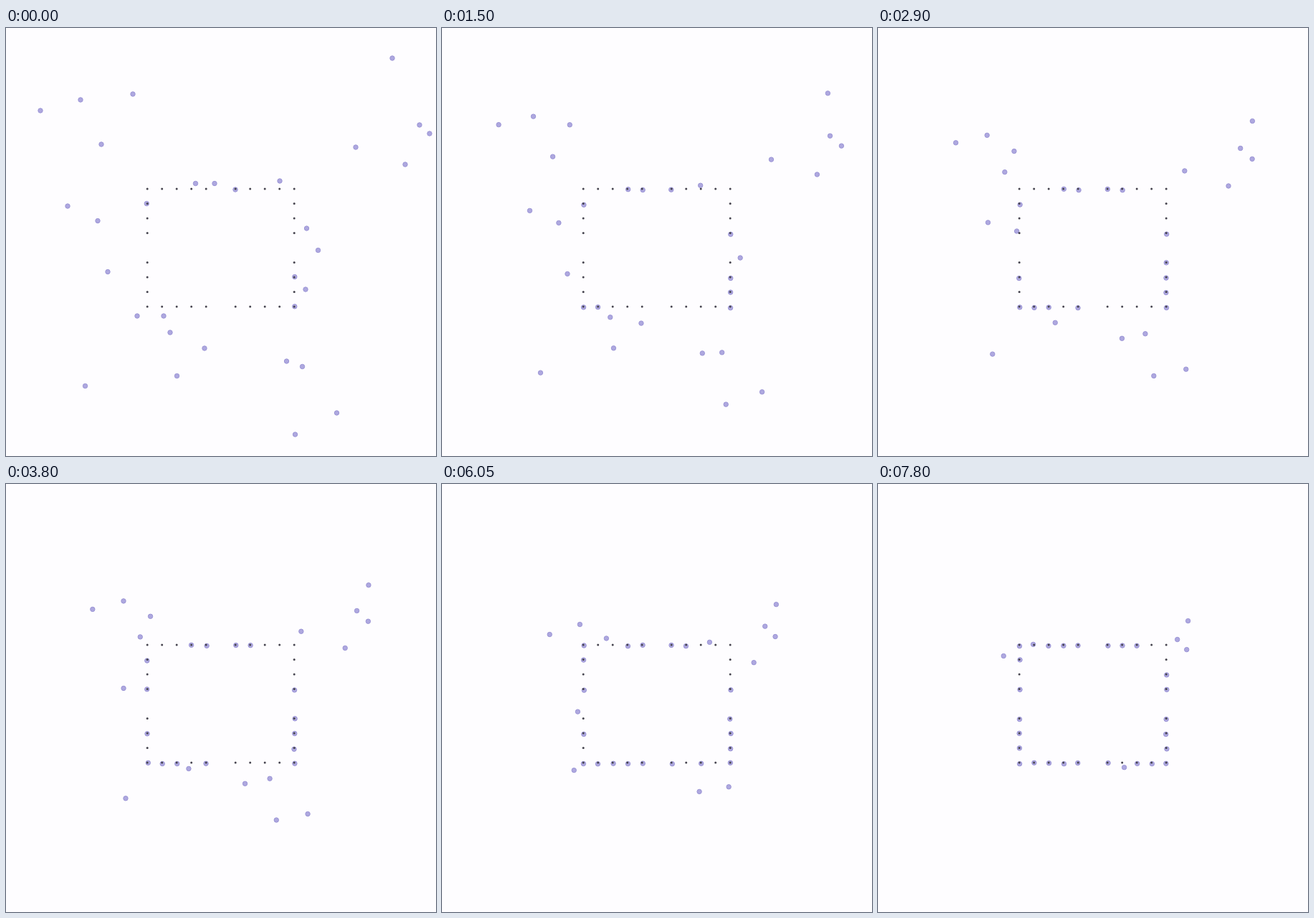
These frames come from a looping animation (600 px wide and 596 px high, 8 s). An HTML page with a canvas:

```html
<!DOCTYPE html>
<html lang="en">
<head>
<meta charset="utf-8">
<title>Particles settling into a rectangle</title>
<style>
  html, body { margin: 0; width: 100%; height: 100%; overflow: hidden; background: #fefdff; }
  canvas { display: block; width: 600px; height: 596px; }
</style>
</head>
<body>
<canvas id="stage" width="600" height="596"></canvas>
<script>
const LOOP = 8000;
const TURN = 2050; // far particles change heading here
const COLS = 10, ROWS = 8;
const ctx = document.getElementById('stage').getContext('2d');

// Slots run clockwise from the top left corner, with a gap in the middle of each side.
const slots = [];
function addSlot(col, row) {
  if (col !== COLS / 2 && row !== ROWS / 2) {
    slots.push({ x: 197.2 + col * 20.5, y: 224 + row * 20.5 });
  }
}
for (let c = 0; c < COLS; c++) addSlot(c, 0);
for (let r = 0; r < ROWS; r++) addSlot(COLS, r);
for (let c = COLS; c > 0; c--) addSlot(c, ROWS);
for (let r = ROWS; r > 0; r--) addSlot(0, r);

// Each particle takes the next slot. Far ones pass a turning point on the way.
const particles = [];
function add(x, y, turnX, turnY) {
  const start = { x, y };
  const turn = turnX && { x: turnX, y: turnY };
  particles.push({ start, turn, slot: slots[particles.length] });
}

// Top
add(133, 162, 167, 189);
add(104, 100, 141, 136.5);
add(177, 92, 179, 159.5);
add(264.5, 216.5);
add(291, 216.5);
add(320, 225);
add(382, 213);
add(488, 166, 443, 193);
add(539, 42, 538, 119);
// Right
add(577, 135, 521, 159);
add(591, 147, 538, 174);
add(557, 190, 504, 212);
add(419.5, 279);
add(435.5, 309.5);
add(402.8, 346.5);
add(418, 364);
// Bottom
add(402.8, 387.8);
add(461.5, 536, 438, 490);
add(413.5, 471.5, 377.5, 440.5);
add(403.5, 566, 392, 500);
add(391.5, 464, 347, 446.5);
add(277, 446, 278.5, 391);
add(238.5, 484.5, 240, 423.5);
add(229, 424);
add(220, 401);
// Left
add(183, 401);
add(110.5, 498.5, 153, 469.5);
add(142, 339.5, 194, 344);
add(86, 248, 143.5, 258);
add(128, 268.5, 183, 273);
add(48, 115, 97, 146);
add(196.3, 244.5);

// The picture is held between ticks: quick bursts with slower stretches between them.
const bursts = [[50, 950], [TURN, 2600], [3200, 6300], [7200, LOOP]];
const ticks = [0];
bursts.forEach(([from, to], i) => {
  const next = i + 1 < bursts.length ? bursts[i + 1][0] : LOOP;
  for (let t = from; t < to; t += 120) ticks.push(t);
  for (let t = to; t < next; t += 300) ticks.push(t);
});

const noise = n => {
  const v = Math.sin(n * 12.9898) * 43758.5453;
  return (v - Math.floor(v)) * 1.6 - 0.8;
};

const mix = (a, b, f) => ({ x: a.x + (b.x - a.x) * f, y: a.y + (b.y - a.y) * f });

function place({ start, turn, slot }, t, seed) {
  if (turn && t < TURN) return mix(start, turn, (t / TURN) ** 0.92);
  const from = turn || start;
  const goal = { x: slot.x + 0.3, y: slot.y + 1 };
  const dist = Math.hypot(goal.x - from.x, goal.y - from.y);
  const speed = 0.0165 + dist * 0.00003; // longer trips go faster
  const gone = (t - (turn ? TURN : 0)) * speed;
  if (gone < dist) return mix(from, goal, gone / dist);
  return { x: goal.x + noise(seed + 1), y: goal.y + noise(seed + 2) };
}

function disc({ x, y }, r) {
  ctx.beginPath();
  ctx.arc(x, y, r, 0, Math.PI * 2);
  ctx.fill();
}

function draw(step) {
  ctx.fillStyle = '#fefdff';
  ctx.fillRect(0, 0, 600, 596);
  ctx.fillStyle = '#aea8df';
  ctx.strokeStyle = '#9c95d6';
  particles.forEach((p, id) => {
    disc(place(p, ticks[step], id * 131 + step * 7), 3.2);
    ctx.stroke();
  });
  ctx.fillStyle = '#46444f';
  slots.forEach(slot => disc(slot, 1.5));
}

const begin = performance.now();
let shown = -1;
function frame() {
  const t = (performance.now() - begin) % LOOP;
  let step = ticks.length - 1;
  while (ticks[step] > t) step--;
  if (step !== shown) draw(shown = step);
  requestAnimationFrame(frame);
}
frame();
</script>
</body>
</html>
```
